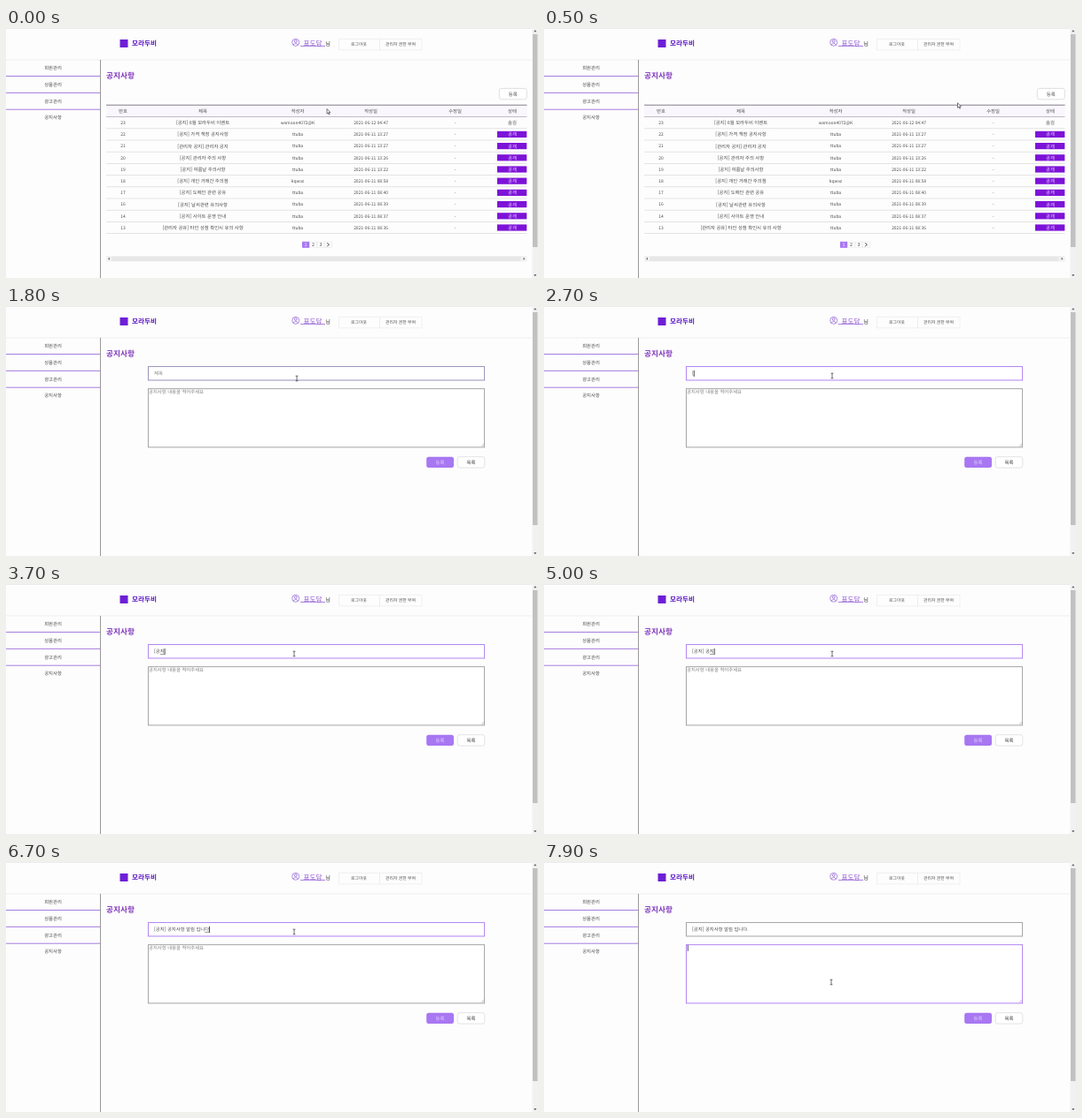
Write an HTML page that moves like this. It is 600 px wide and 283 px high and loops after 8 s.

```html
<!DOCTYPE html>
<html lang="ko">
<head>
<meta charset="utf-8">
<title>공지사항</title>
<style>
  html, body { margin: 0; width: 100%; height: 100%; overflow: hidden; background: #fdfdfd; }
  svg { display: block; width: 600px; height: 283px; }
  text { font-family: "Noto Sans CJK KR", "Noto Sans CJK", sans-serif; white-space: pre; text-rendering: geometricPrecision; }
</style>
</head>
<body>
<svg id="stage" viewBox="0 0 600 283"></svg>
<script>
const LOOP = 8000, TICK = 100;
const INK = '#4a4a4a', PURPLE = '#a877f2', GRAY = '#9b9b9b';

// Markup helpers; text is placed by its vertical centre.
const text = (x, cy, str, { size = 5.35, fill = INK, anchor = 'middle', weight = 400, id = '' } = {}) =>
  `<text id="${id}" x="${x}" y="${cy + size * 0.37}" font-size="${size}" fill="${fill}" text-anchor="${anchor}" font-weight="${weight}">${str}</text>`;
const rect = (x, y, w, h, fill, extra = '') =>
  `<rect x="${x}" y="${y}" width="${w}" height="${h}" fill="${fill}" ${extra}/>`;
const line = (x, y, w, color, h = 0.8) => rect(x, y - h / 2, w, h, color);
const path = (d, extra) => `<path d="${d}" ${extra}/>`;
const outline = (color, width = 0.7, r = 0) => `stroke="${color}" stroke-width="${width}" rx="${r}"`;
const group = (id, body) => `<g id="${id}">${body}</g>`;

function frameMarkup() {
  const menu = ['회원관리', '상품관리', '광고관리', '공지사항'];
  return [
    rect(0, 0, 600, 283, '#fdfdfd'),
    line(0, 0.5, 593, '#e8e8e8'),
    line(0, 36, 593, '#ececec'),
    rect(128.5, 13, 9, 9, '#6d1fd6'),
    text(142, 17.3, '모라두비', { size: 7.6, fill: '#5b18c4', anchor: 'start', weight: 900 }),
    `<g fill="none" stroke="#8a5bd0" stroke-width=".7"><circle cx="326.7" cy="16.3" r="4"/><circle cx="326.7" cy="15" r="1.4"/>`,
    path('M324.2 19.1q2.5-3.8 5 0', ''), '</g>',
    text(346, 16.7, '표도담', { size: 7.6, fill: '#8a4fd0' }),
    line(332, 20.6, 28, '#8a4fd0', 0.7),
    text(363, 17.3, '님', { size: 6.2, fill: '#333', weight: 500 }),
    rect(375.3, 12.3, 46.2, 12.6, 'none', outline('#ebebeb')),
    rect(421.5, 12.3, 47.5, 12.6, 'none', outline('#ebebeb')),
    text(398, 18.6, '로그아웃', { size: 4.85 }),
    text(445, 18.6, '관리자 권한 부여', { size: 4.85 }),
    rect(106, 36, 1, 247, '#999'),
    ...menu.map((label, i) => text(53, 45.2 + i * 18.75, label)),
    ...[54.5, 73.4, 92.2].map(y => line(0, y, 106, '#a77fe0', 1)),
    text(113, 54, '공지사항', { size: 8.7, fill: '#8038bd', anchor: 'start', weight: 700 }),
    rect(593.5, 0, 6.5, 283, '#f1f1f1'),
    rect(594, 7, 5.5, 241, '#c1c1c1'),
    path('M595.2 4.2l1.6-2 1.6 2zM595.2 279l1.6 2 1.6-2z', 'fill="#555"')
  ].join('');
}

function listMarkup() {
  const columns = [132, 222, 329, 411.5, 506.5, 571];
  const row = (no, title, date, author = 'ttuba') => [no, title, author, `2021-06-${date}`, '-'];
  const rows = [
    row(23, '[공지] 6월 모라두비 이벤트', '12 04:47', 'wxmoon4072@K'),
    row(22, '[공지] 가격 책정 공지사항', '11 13:27'),
    row(21, '[관리자 공지] 관리자 공지', '11 13:27'),
    row(20, '[공지] 관리자 주의 사항', '11 13:26'),
    row(19, '[공지] 여름날 주의사항', '11 13:22'),
    row(18, '[공지] 개인 거래간 주의점', '11 08:58', 'kqwvz'),
    row(17, '[공지] 도메인 관련 공유', '11 08:40'),
    row(16, '[공지] 날씨관련 유의사항', '11 08:39'),
    row(14, '[공지] 사이트 운영 안내', '11 08:37'),
    row(13, '[관리자 공유] 타인 상점 확인시 유의 사항', '11 08:36')
  ];
  const table = rows.map((cells, i) => {
    const y = 107.2 + i * 13.2;
    const status = i
      ? rect(554, y - 3.6, 33.3, 7.2, '#7d12d8') + text(571, y, '공개', { fill: '#f0e2ff' })
      : text(571, y, '숨김');
    return cells.map((cell, c) => text(columns[c], y, cell, { size: c === 1 ? 5.35 : 4.9 })).join('')
      + status + line(113, y + 6.6, 474.5, '#d9d9d9', 0.7);
  });
  return [
    rect(556.3, 68.4, 31, 12.4, '#fff', `id="add" ${outline('#d8d8d8', 0.8, 2.5)}`),
    text(571.7, 74.6, '등록', { id: 'addLabel' }),
    rect(113, 87, 474.5, 13.5, '#f9f7fd'),
    line(113, 87.2, 474.5, '#77707f', 0.9),
    line(113, 100.5, 474.5, '#b5aabf'),
    ...['번호', '제목', '작성자', '작성일', '수정일', '상태'].map((h, i) => text(columns[i], 94, h)),
    ...table,
    rect(334, 241.8, 8.2, 7, PURPLE),
    ...[342.6, 351, 359.4].map(x => rect(x, 242, 8, 6.6, 'none', outline('#e4e4e4', 0.5))),
    text(338.1, 245.3, '1', { fill: '#fff' }),
    text(346.6, 245.3, '2'), text(355, 245.3, '3'),
    path('M362.2 243.3l2 2-2 2', 'fill="none" stroke="#222" stroke-width=".9"'),
    rect(113, 258, 474.5, 6.4, '#f1f1f1'),
    rect(119.5, 258.6, 461, 5.2, '#e7e7e7'),
    path('M117 259.6l-2 1.6 2 1.6zM583.5 259.6l2 1.6-2 1.6z', 'fill="#777"')
  ].join('');
}

function formMarkup() {
  return [
    rect(160.4, 68.6, 379.2, 15.4, '#fff', `id="titleBox" ${outline(GRAY, 0.9)}`),
    rect(160.4, 93.7, 379.2, 66.2, '#fff', `id="bodyBox" ${outline(GRAY, 0.9)}`),
    path('M536 158.8l3-3M537.8 158.8l1.2-1.2', 'stroke="#888" stroke-width=".5"'),
    text(167, 76.4, '제목', { anchor: 'start', fill: '#808080', id: 'titleHint' }),
    text(161, 97.2, '공지사항 내용을 적어주세요', { anchor: 'start', fill: '#808080', id: 'bodyHint' }),
    text(167, 76.4, '<tspan id="done"></tspan><tspan id="composing" text-decoration="underline"></tspan>',
      { anchor: 'start', id: 'typed' }),
    rect(0, 0, 0.8, 7, '#222', 'id="caret"'),
    rect(474.2, 170.7, 30.8, 12.4, PURPLE, 'rx="2.5"'),
    rect(509.2, 170.7, 30.6, 12.4, '#fff', outline('#dcdcdc', 0.8, 2.5)),
    text(489.5, 176.9, '등록', { fill: '#e6d5ff' }),
    text(524.5, 176.9, '목록', { fill: '#333' })
  ].join('');
}

const cursors = {
  arrow: path('M0 0v5.6l1.3-1.2 1 2.1 .8-.4-1-2h1.8z', 'fill="#fff" stroke="#222" stroke-width=".6"'),
  hand: path('M-.6-3q.6-.7 1.1 0v2.2l2.3.7q.6.3.5 1l-.5 2.6h-3.3l-1.9-2.6q.2-.9 1.8 0z', 'fill="#fff" stroke="#222" stroke-width=".6"'),
  beam: path('M-1.4-2.8h2.8M0-2.8v5.6M-1.4 2.8h2.8', 'fill="none" stroke="#333" stroke-width=".7"')
};

// Each run: start, time per key, and syllables as "result=states while composing".
const runs = [
  [2700, 0, '['],
  [3300, 100, '공=ㄱ고공/지=ㅈ지'],
  [3900, 0, ']'],
  [4300, 0, ' '],
  [4660, 85, '공=ㄱ고공/지=ㅈ지짓/사=사샇/항=하항/ /알=ㅇ아알/림=ㄹ리림/ /입=ㅇ이입/니=ㄴ니닏/다'],
  [6900, 0, '.']
];
const keys = [{ at: 2200, done: '', composing: '' }];
let written = '';
for (const [start, gap, syllables] of runs) {
  let at = start;
  for (const part of syllables.split('/')) {
    const [result, states = result] = part.split('=');
    for (const state of states) {
      const hangul = state > 'ㄱ' || state === 'ㄱ';
      keys.push({ at, done: written + (hangul ? '' : state), composing: hangul ? state : '' });
      at += gap;
    }
    written += result;
  }
}

// Pointer waypoints: time, x, y.
const route = [[0, 362, 91.5], [100, 362, 91.5], [900, 571, 78], [1300, 571, 78],
  [1800, 328, 82], [2200, 325, 79], [7200, 325, 79], [7700, 324, 136], [LOOP, 324, 136]];

function pointerAt(t) {
  const i = route.findIndex(p => p[0] > t);
  const [t0, x0, y0] = route[i - 1], [t1, x1, y1] = route[i];
  const p = (t - t0) / (t1 - t0), e = p * p * (3 - 2 * p);
  return [x0 + (x1 - x0) * e, y0 + (y1 - y0) * e];
}

document.getElementById('stage').innerHTML = frameMarkup() + group('list', listMarkup()) + group('form', formMarkup())
  + group('pointer', Object.entries(cursors).map(([id, d]) => group(id, d)).join(''));
const el = id => document.getElementById(id);
const show = (id, on) => el(id).setAttribute('visibility', on ? 'inherit' : 'hidden');
const set = (id, attrs) => { for (const name in attrs) el(id).setAttribute(name, attrs[name]); };

function draw(t) {
  const onForm = t >= 1300, hover = t >= 900, inTitle = t >= 2200 && t < 7800, inBody = t >= 7800;
  el('list').setAttribute('visibility', onForm ? 'hidden' : 'visible');
  el('form').setAttribute('visibility', onForm ? 'visible' : 'hidden');
  set('add', { fill: hover ? '#c9a6fb' : '#fff', stroke: hover ? '#c9a6fb' : '#d8d8d8' });
  show('addLabel', !hover);

  const key = keys.findLast(k => k.at <= t) || keys[0];
  el('done').textContent = key.done;
  el('composing').textContent = inBody ? '' : key.composing;
  show('titleHint', t < 2200);
  show('bodyHint', !inBody);
  set('titleBox', { stroke: inTitle ? PURPLE : t < 2200 ? '#8f86b4' : GRAY });
  set('bodyBox', { stroke: inBody ? PURPLE : GRAY });

  const caretX = inBody ? 161.8 : 167 + el('typed').getComputedTextLength();
  set('caret', { x: caretX, y: inBody ? 93.9 : 73 });
  show('caret', inBody || (inTitle && (t - key.at) % 1000 < 500));

  const [x, y] = pointerAt(t);
  set('pointer', { transform: `translate(${x} ${y})` });
  const shape = t < 900 || (t >= 1400 && t < 1800) ? 'arrow' : t < 1400 ? 'hand' : 'beam';
  for (const id in cursors) show(id, id === shape);
}

function tick() {
  draw(Math.floor(performance.now() % LOOP / TICK) * TICK);
  requestAnimationFrame(tick);
}
tick();
</script>
</body>
</html>
```
